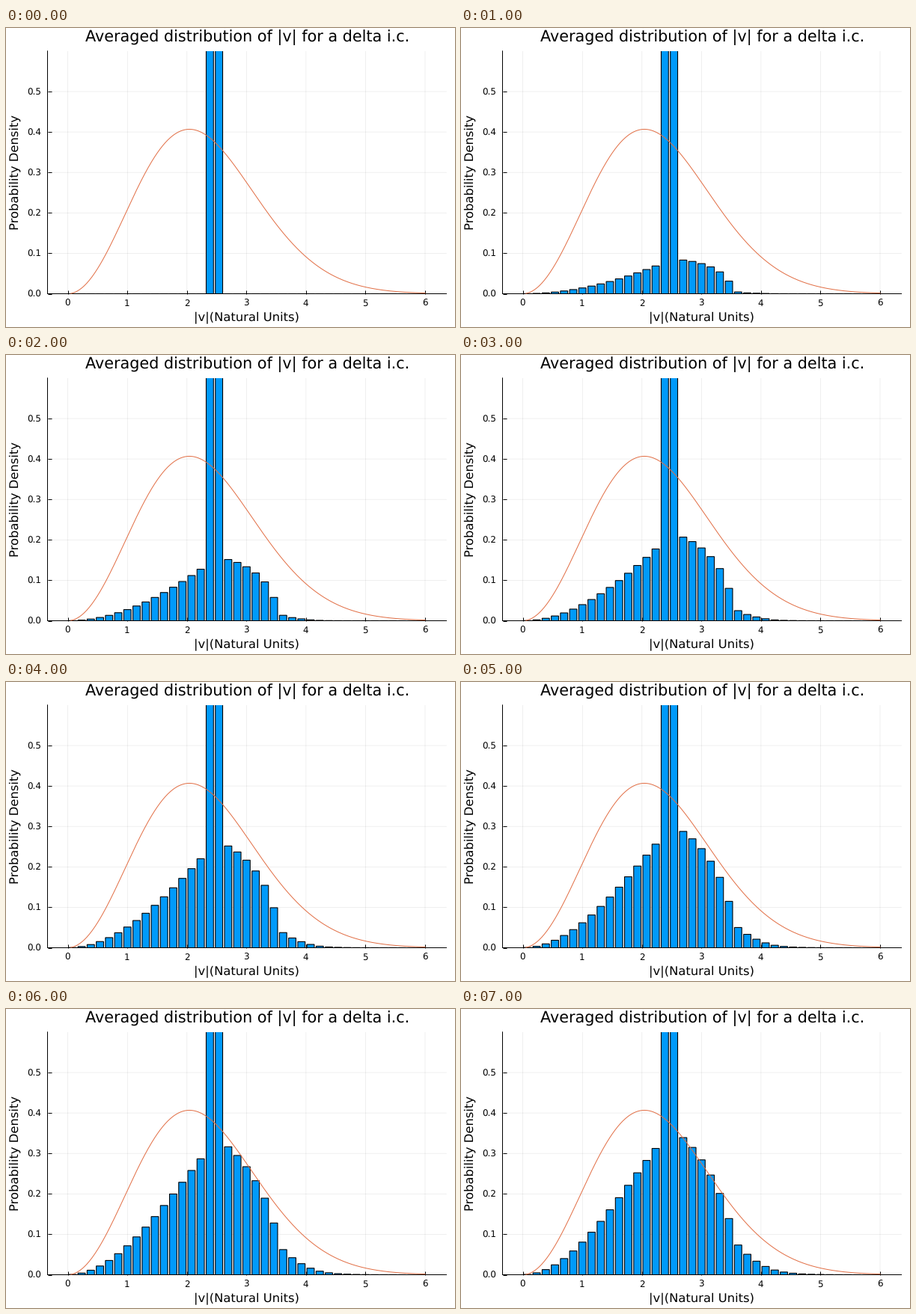
Write a matplotlib script that moves like this. It is 600 px wide and 400 px high and loops after 8000 ms.

```python
import numpy as np
import matplotlib.pyplot as plt
from matplotlib.animation import FuncAnimation

W, H = 600, 400
PX = 0.72  # points per pixel at 100 dpi
BLUE, ORANGE = "#009afa", "#e26f46"
X0, X_UNIT = 82.7, 79.55
Y0, Y_UNIT = 355.5, 541
LEFT, RIGHT, TOP = 55.5, 588.5, 30.8

V0 = 2.5        # initial speed of every particle
RATE = 0.1545   # collisions per particle and frame at the start
BINS, SUB = 39, 4
STEP = 6 / BINS
FRAMES, SUBSTEPS = 8, 20


def collision_tables(v):
    """Hard sphere collision rates and outgoing speeds for all pairs (u, w)."""
    u, w = v[:, None], v[None, :]
    low, high = np.minimum(u, w), np.maximum(u, w)
    rate = (high + low ** 2 / (3 * high)) / (4 / 3 * V0)
    energy = (u ** 2 + w ** 2)[:, :, None]
    partner = np.sqrt(np.maximum(energy - v ** 2, 0))
    out = v * np.minimum(np.minimum(v, partner), low[:, :, None])
    out /= out.sum(axis=2, keepdims=True)
    return rate, out.reshape(-1, len(v))


def relax():
    """Bar heights per frame while an initial delta relaxes by collisions."""
    n = BINS * SUB
    v = (np.arange(n) + 0.5) * STEP / SUB
    rate, out = collision_tables(v)
    share = np.zeros(n)
    edge = 16 * SUB  # the delta straddles this bin edge
    share[edge - 1], share[edge + 1] = 0.25, 0.75
    dt = RATE / SUBSTEPS
    heights = []
    for _ in range(FRAMES):
        heights.append(share.reshape(BINS, SUB).sum(axis=1) / STEP)
        for _ in range(SUBSTEPS):
            hits = rate * np.outer(share, share)
            share = share + dt * (hits.ravel() @ out - hits.sum(axis=1))
    return heights


plt.rcParams.update({"font.family": "DejaVu Sans", "text.hinting": "none",
                     "path.snap": False})
fig = plt.figure(figsize=(W / 100, H / 100), dpi=100, facecolor="white")
ax = fig.add_axes([LEFT / W, 1 - Y0 / H, (RIGHT - LEFT) / W, (Y0 - TOP) / H])
ax.set_xlim((LEFT - X0) / X_UNIT, (RIGHT - X0) / X_UNIT)
ax.set_ylim(0, (Y0 - TOP) / Y_UNIT)


def label(x, y, text, size, ha="center", rotation=0):
    fig.text(x / W, 1 - y / H, text, fontsize=size * PX, ha=ha, va="baseline",
             rotation=rotation, rotation_mode="anchor")


# Axes, grid and labels
ax.set_axisbelow(True)
ax.grid(color="black", alpha=0.1, lw=0.6 * PX)
ax.set_xticks(range(7))
ax.set_yticks(np.arange(6) / 10)
ax.tick_params(direction="in", length=5 * PX, width=PX,
               labelbottom=False, labelleft=False)
for side, spine in ax.spines.items():
    spine.set(visible=side in ("left", "bottom"), linewidth=PX, zorder=0.6)

for k in range(7):
    label(X0 + k * X_UNIT - 0.3, 371.7, str(k), 11.9)
for k in range(6):
    label(47.3, Y0 - k / 10 * Y_UNIT + 4.7, f"{k / 10:.1f}", 11.9, ha="right")
label(322.8, 18.5, "Averaged distribution of |v| for a delta i.c.", 20.77)
label(321.5, 392, "|v|(Natural Units)", 16.36)
label(16.3, 193.2, "Probability Density", 16.36, rotation=90)

# Equilibrium speed distribution with the same energy
var = V0 ** 2 / 3
speed = np.linspace(0.05, 6, 400)
pdf = (np.sqrt(2 / np.pi) * speed ** 2 / var ** 1.5
       * np.exp(-speed ** 2 / (2 * var)))
ax.plot(speed, pdf, color=ORANGE, lw=PX, zorder=4)

history = relax()
bars = ax.bar((np.arange(BINS) + 0.5) * STEP, history[0], 0.8 * STEP,
              color=BLUE, edgecolor="black", lw=1.1 * PX, zorder=3)


def update(frame):
    for bar, height in zip(bars, history[frame]):
        bar.set_height(height)
    return list(bars)


anim = FuncAnimation(fig, update, frames=FRAMES, interval=1000, repeat=True,
                     repeat_delay=0, blit=False)
plt.show()
```
